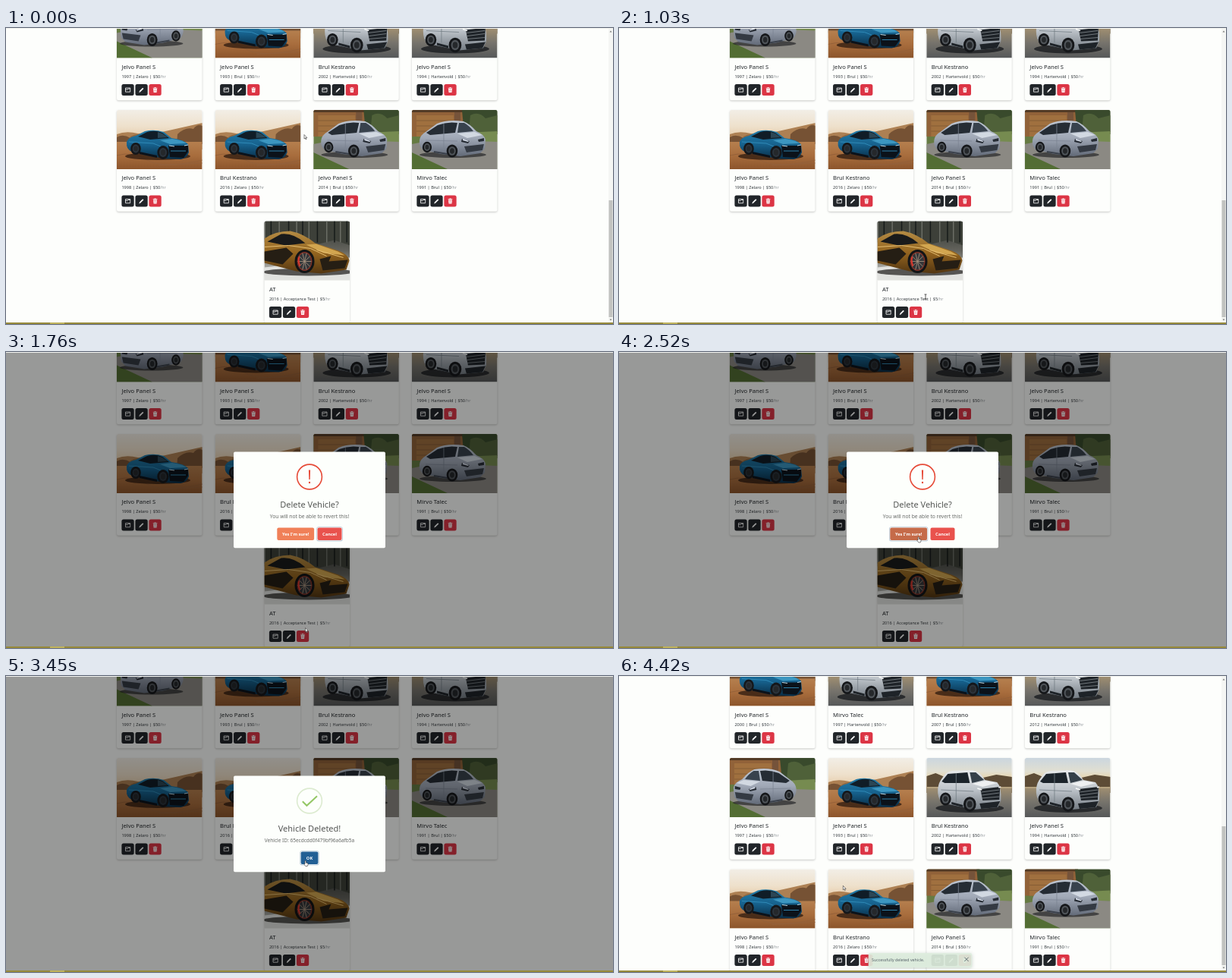
Animation, 800 px wide and 390 px high, one loop 4.45 s. Source, as an HTML page with a canvas:

```html
<!DOCTYPE html>
<html lang="en">
<head>
<meta charset="utf-8">
<title>Delete vehicle</title>
<style>
html, body { margin: 0; width: 100%; height: 100%; overflow: hidden; background: #fdfefc; }
canvas { display: block; width: 800px; height: 390px; }
</style>
</head>
<body>
<canvas id="stage" width="800" height="390"></canvas>
<script>
const g = document.getElementById('stage').getContext('2d');
const LOOP = 4450;
const FONT = '"Noto Sans", "Open Sans", sans-serif';
const ROW = 146.5, COL = 129.65, CARD_W = 112.5, PHOTO_H = 78;

const OPEN = 1330, CONFIRM = 2560, SUCCESS = 2650, DISMISS = 3520, REFRESH = 3560;

const clamp = v => Math.max(0, Math.min(1, v));
const smooth = v => v * v * (3 - 2 * v);

// Interpolates [time, ...values] keys.
function keyed(keys, t, ease = v => v) {
  let i = 0;
  while (i < keys.length - 2 && t >= keys[i + 1][0]) i++;
  const [a, b] = [keys[i], keys[i + 1]];
  const k = ease(clamp((t - a[0]) / (b[0] - a[0])));
  return a.slice(1).map((v, n) => v + (b[n + 1] - v) * k);
}

function rect(x, y, w, h, color) {
  g.fillStyle = color;
  g.fillRect(x, y, w, h);
}

function rounded(x, y, w, h, r, color) {
  g.beginPath();
  g.roundRect(x, y, w, h, r);
  g.fillStyle = color;
  g.fill();
}

function ellipse(x, y, rx, ry, color) {
  g.beginPath();
  g.ellipse(x, y, rx, ry, 0, 0, Math.PI * 2);
  g.fillStyle = color;
  g.fill();
}

const paths = new Map();
function path(d) {
  if (!paths.has(d)) paths.set(d, new Path2D(d));
  return paths.get(d);
}
function shape(color, d) {
  g.fillStyle = color;
  g.fill(path(d));
}
function line(color, width, d) {
  g.strokeStyle = color;
  g.lineWidth = width;
  g.stroke(path(d));
}

function text(str, x, y, size, weight, color, align = 'left') {
  g.font = `${weight} ${size}px ${FONT}`;
  g.textAlign = align;
  g.fillStyle = color;
  g.fillText(str, x, y);
  return g.measureText(str).width;
}

function gradient(y0, y1, ...colors) {
  const fill = g.createLinearGradient(0, y0, 0, y1);
  colors.forEach((c, i) => fill.addColorStop(i / (colors.length - 1), c));
  return fill;
}

function wheel(x, y, r, rim = '#50555a') {
  ellipse(x, y, r * .85, r, '#15171a');
  ellipse(x, y, r * .55, r * .68, rim);
  ellipse(x, y, r * .34, r * .44, '#25282b');
}

function hatchback() {
  ellipse(54, 59, 44, 4, 'rgba(30,30,33,.65)');
  shape(gradient(13, 60, '#bfc7d3', '#a1a9b7', '#656d7b'), 'M10 40Q11 33 18 29L33 18Q47 12 68 15Q76 18 85 28Q95 32 97 39L96 51L90 57L64 61L38 58L14 52Q9 47 10 40Z');
  shape('#252c34', 'M19 30L34 20Q47 15 60 17L57 30L24 33Z');
  shape('#38424d', 'M62 17L69 17Q76 21 81 28L60 30Z');
  shape('#d2d9e2', 'M60 31L83 29L93 33L73 37Z');
  shape('#262c34', 'M66 38L76 41L74 44L65 42ZM87 39L95 37L95 41L88 42Z');
  shape('#d9e0ed', 'M67 38L75 41L74 42L67 40Z');
  shape('#343a43', 'M69 48L95 45L93 53L72 56Z');
  shape('#3a404a', 'M29 54L47 57L47 59L29 56Z');
  line('#7d8593', .8, 'M18 40L60 41M42 18L42 53');
  wheel(20, 49, 7.2);
  wheel(53, 54, 8.6);
}

function driveway() {
  rect(0, 0, 112.5, 78, '#667b43');
  rect(0, 0, 70, 35, '#916239');
  rect(6, 7, 49, 28, '#a0703f');
  rect(0, 0, 70, 3, '#533b26');
  rect(56, 3, 8, 32, '#75533a');
  line('#7a5332', .7, 'M6 14H55M6 21H55M6 28H55');
  shape('#394a2c', 'M66 0H113V32H69Z');
  shape('#4f6139', 'M77 7Q88 1 97 11L113 7V29H75Z');
  shape('#768b50', 'M68 30L113 28V42H68Z');
  shape('#8b8983', 'M0 45L30 39L113 42V78H45L0 57Z');
  shape('#536d34', 'M0 56L47 78H0Z');
}

const photos = {
  coupe() {
    rect(0, 0, 112.5, 78, gradient(0, 44, '#f2eee6', '#eee0cb', '#e3c299'));
    shape('#ad8053', 'M0 32Q12 27 28 31L55 30Q82 24 113 17V52H0Z');
    shape('#765234', 'M80 32Q90 22 101 25Q106 18 113 21V45H79ZM0 36Q8 31 18 37V45H0Z');
    shape('#926840', 'M18 35Q28 29 38 35L32 42H16Z');
    rect(0, 42, 112.5, 36, gradient(42, 78, '#b57f4e', '#a86d3d', '#8c552c'));
    line('#946039', 1, 'M0 60Q20 54 40 66T113 66M55 73L113 70');
    ellipse(54, 61, 43, 5, 'rgba(43,24,14,.75)');
    shape(gradient(26, 64, '#237ca8', '#17638f', '#092f49'), 'M13 42Q15 36 25 34L37 28Q49 25 62 29L72 37Q88 39 94 45L95 56Q92 64 84 65L62 64L20 55Q12 52 13 42Z');
    shape('#101d27', 'M28 35L40 29Q51 26 60 30L69 37L44 39Z');
    shape('#2b4655', 'M54 29L60 31L67 36L54 37Z');
    shape('#3c96c0', 'M57 40L73 38Q88 40 92 44L70 45Z');
    shape('#0b121a', 'M68 47L94 47V55L88 63L70 62ZM30 55L53 60L53 63L30 58Z');
    line('#338eba', .9, 'M16 42L48 44L58 48M71 54L91 54');
    line('#c1d8e2', 1, 'M69 47L76 48M89 47L94 46');
    wheel(25, 51, 8, '#2c343c');
    wheel(61, 56, 9, '#2c343c');
  },
  hatch() {
    driveway();
    hatchback();
  },
  hatchLeft() {
    driveway();
    g.translate(97, 0);
    g.scale(-.95, 1);
    hatchback();
  },
  suv() {
    rect(0, 0, 112.5, 46, gradient(0, 35, '#cbd6df', '#e1dfd1', '#edce91'));
    shape('#5d4c36', 'M0 24L12 20L24 25L44 23L70 27L92 22L113 25V46H0Z');
    rect(0, 38, 112.5, 40, gradient(38, 78, '#a29071', '#76736c', '#565859'));
    line('#c9b58d', 1, 'M0 39H113');
    ellipse(57, 66, 45, 6, 'rgba(20,23,27,.75)');
    shape(gradient(16, 68, '#e8eaec', '#bdc3c9', '#747c84'), 'M15 40Q16 32 21 26Q25 18 34 17L60 16Q70 17 77 29L93 32Q99 38 98 56L94 65L62 68L20 59Q14 52 15 40Z');
    shape('#1c242b', 'M20 31L28 21L54 19L57 33L24 33Z');
    shape('#354049', 'M57 19H65L76 29L60 33Z');
    shape('#eef0f1', 'M60 34L78 30L93 33L74 38Z');
    shape('#1e2328', 'M71 41L97 38L96 55L74 56ZM70 60L97 57L93 65L72 67ZM33 58L48 62L48 65L33 61Z');
    line('#949b9f', .7, 'M72 45L96 42M73 49L96 46M73 53L96 51');
    line('#f8fafa', 1.6, 'M67 40L73 42M95 39L98 38');
    line('#747e86', .8, 'M19 42L62 44M39 20V58');
    wheel(25, 54, 8.6);
    wheel(57, 61, 9.8);
  },
  sports() {
    rect(0, 0, 112.5, 78, gradient(0, 78, '#292d2b', '#64645d', '#dadbd7'));
    shape('#3d4039', 'M0 0H113V32L92 25L72 30L0 24Z');
    for (let i = 0; i < 12; i++) rect(i * 10 + 2 * Math.sin(i * 5), 0, 1.5, 28, i % 2 ? '#171b1a' : '#6b6d65');
    shape('#e1e2df', 'M0 61L113 48V78H0Z');
    ellipse(58, 67, 60, 5, 'rgba(27,25,23,.7)');
    shape(gradient(14, 70, '#b38a43', '#93641f', '#503411'), 'M0 23Q14 13 34 13Q51 16 67 29L98 39Q111 44 112 52L108 64L75 69L42 66L0 55Z');
    shape('#191a1b', 'M4 27L22 17Q38 15 54 29L28 32Z');
    shape('#d2a650', 'M55 31L68 30L97 40L106 45L78 42Z');
    shape('#251e14', 'M0 40L29 35L38 43L24 57L0 52ZM73 50L88 46L85 53L110 51L106 62L77 65Z');
    line('#e4bd70', 1, 'M0 34L32 32L61 36L82 46M69 38L104 48');
    ellipse(53, 53, 13, 15.5, '#121416');
    ellipse(53, 53, 10, 12.5, '#813127');
    ellipse(53, 53, 8.6, 11, '#34373a');
    for (let i = 0; i < 10; i++) {
      const a = i * Math.PI / 5;
      g.beginPath();
      g.moveTo(53, 53);
      g.lineTo(53 + 9 * Math.cos(a), 53 + 11.5 * Math.sin(a));
      g.strokeStyle = '#a18d7a';
      g.lineWidth = .9;
      g.stroke();
    }
    line('#d8382e', 2, 'M46 47Q44 53 47 59');
  }
};

const SEDAN = 'Jelvo Panel S', PONY = 'Brul Kestrano', CITY = 'Mirvo Talec';
const Z = 'Zelaro', B = 'Brul', H = 'Hartenvold';
const rows = [
  [['coupe', SEDAN, 2000, B], ['suv', CITY, 1997, H], ['coupe', PONY, 2007, B], ['suv', PONY, 2012, H]],
  [['hatchLeft', SEDAN, 1997, Z], ['coupe', SEDAN, 1993, B], ['suv', PONY, 2002, H], ['suv', SEDAN, 1994, H]],
  [['coupe', SEDAN, 1998, Z], ['coupe', PONY, 2016, Z], ['hatch', SEDAN, 2014, B], ['hatch', CITY, 1991, B]]
];
const lastCar = ['sports', 'AT', 2016, 'Acceptance Test', 5];

function cardButtons(hover) {
  ['#212529', '#212529', hover ? '#bb2d3b' : '#dc3545'].forEach((c, i) => rounded(6.4 + i * 18, 112.5, 16.3, 15, 2.5, c));
  line('#fff', .8, 'M11.5 117.5H17.7V122.7H11.5ZM11.5 119.5H14.5L15.2 118.5H17.7');
  line('#fff', 1.7, 'M30.4 122.2L34.8 117.8');
  shape('#fff', 'M29.2 123.5L30 121.4L31.3 122.7Z');
  shape('#fff', 'M48.1 118.5H53L52.5 123.4H48.6ZM47.7 117.2H53.4V118.1H47.7ZM49.6 116.5H51.5V117.2H49.6Z');
  line('#dc3545', .4, 'M49.8 119.3V122.6M51.3 119.3V122.6');
}

function card(x, y, [photo, title, year, maker, price = 50], hover) {
  g.save();
  g.translate(x, y);
  g.save();
  g.shadowColor = 'rgba(0,0,0,.22)';
  g.shadowBlur = 2.5;
  g.shadowOffsetY = 1;
  rounded(0, 0, CARD_W, 133.7, 2.5, '#fdfefc');
  g.restore();
  g.save();
  g.beginPath();
  g.roundRect(0, 0, CARD_W, PHOTO_H, [2.5, 2.5, 0, 0]);
  g.clip();
  photos[photo]();
  g.restore();
  text(title, 6.4, 92.2, 7.6, 500, '#212529');
  const w = text(`${year} | ${maker} | $${price}`, 6.4, 104.2, 5.6, 400, '#343a3f');
  text('/hr', 6.4 + w, 104.2, 5.2, 400, '#90969a');
  cardButtons(hover);
  g.restore();
}

function page(t) {
  const refreshed = t >= REFRESH;
  rows.forEach((cars, r) => {
    const y = -38.5 + ROW * (refreshed ? r : r - 1);
    if (y > -140) cars.forEach((car, c) => card(146 + c * COL, y, car));
  });
  if (!refreshed) card(340.5, 254.5, lastCar, t > 1150 && t < 1650);
}

function scrollbar(t) {
  if (t >= OPEN && t < DISMISS) return;
  const top = t < REFRESH ? 227 : 198;
  rect(794, 1, 6, 387, '#f5f6f4');
  rect(794.5, top, 5, 381 - top, '#c1c2c0');
  shape('#777', 'M795.5 5.5L797 3.5L798.5 5.5ZM795.5 383.5L797 385.5L798.5 383.5Z');
}

function modalButton(x, w, label, color, focused) {
  if (focused) {
    rounded(x - 1.3, 230.2, w + 2.6, 19.2, 3, '#b9cbd8');
    rounded(x - .5, 231, w + 1, 17.6, 2.4, '#fff');
  }
  rounded(x, 231.5, w, 16.6, 2, color);
  text(label, x + w / 2, 242, 5.7, 600, '#fff', 'center');
}

function ring(color) {
  g.beginPath();
  g.arc(400, 164.5, 16.4, 0, Math.PI * 2);
  g.strokeStyle = color;
  g.lineWidth = 1.6;
  g.stroke();
}

function confirmBox(t) {
  const hover = t >= 2150;
  ring('#e64b38');
  shape('#e64b38', 'M398.9 155.5H401.1L400.7 168H399.3Z');
  ellipse(400, 172, 1.2, 1.2, '#e64b38');
  text('Delete Vehicle?', 400, 205.2, 11, 500, '#555755', 'center');
  text('You will not be able to revert this!', 400, 219.4, 6.7, 400, '#666866', 'center');
  modalButton(357.3, 48.8, "Yes I'm sure!", hover ? '#c56b49' : '#f08058', t >= 2400);
  modalButton(410.5, 32, 'Cancel', '#e9524d', t < 2400);
}

function successBox(t) {
  ring('#dcebd0');
  const p = clamp((t - SUCCESS - 200) / 450);
  g.save();
  g.setLineDash([27 * smooth(p), 40]);
  if (p > 0) line('#94c766', 2, 'M390.8 165.2L396.4 170.8L410 158.3');
  g.restore();
  text('Vehicle Deleted!', 400, 205.2, 11, 500, '#555755', 'center');
  text('Vehicle ID: 65ecdcdd0f479bf96a6afb5a', 400, 219.4, 6.5, 400, '#666866', 'center');
  modalButton(388.6, 22.8, 'OK', '#215f94', true);
}

function modal(t) {
  const [alpha] = keyed([[OPEN, 0], [1630, 1], [CONFIRM, 1], [SUCCESS, .55], [2740, 1], [DISMISS, 1], [3790, 0]], t, smooth);
  if (alpha <= 0) return;
  g.save();
  g.globalAlpha = alpha;
  rect(0, 1, 800, 387, 'rgba(0,0,0,.4)');
  const done = t >= SUCCESS;
  const start = done ? SUCCESS : OPEN;
  const [scale] = keyed([[0, .5], [135, 1.05], [240, .95], [300, 1]], t - start, smooth);
  g.translate(400, 195);
  g.scale(scale, scale);
  g.translate(-400, -195);
  rounded(300, 131.5, 200, 126.7, 2, '#fdfffc');
  (done ? successBox : confirmBox)(t);
  g.restore();
}

function toast(t) {
  const p = smooth(clamp((t - 3690) / 160));
  if (p <= 0) return;
  g.save();
  g.globalAlpha = p;
  g.translate(0, 14 * (1 - p));
  g.save();
  g.shadowColor = 'rgba(60,90,70,.3)';
  g.shadowBlur = 5;
  g.shadowOffsetY = 1;
  rounded(328.7, 365, 136.3, 19, 2, 'rgba(222,238,222,.91)');
  g.restore();
  const ink = t < 4180 ? '#5c6f9b' : '#566269';
  text('Successfully deleted vehicle.', 333, 375.6, 5.25, 400, ink);
  line(ink, .9, 'M455.3 370.6L460.7 376M460.7 370.6L455.3 376');
  g.restore();
}

const route = [
  [0, 393, 140.5], [120, 393, 140.5], [1030, 404, 354], [1190, 392, 372], [1640, 392, 372],
  [1760, 394.5, 363.5], [2160, 394, 244], [3960, 394, 243.5], [4420, 295.3, 276.3]
];

function cursor(t) {
  const [x, y] = keyed(route, t, smooth);
  const overText = t > 990 && t < 1080;
  const overButton = (t > 1140 && t < OPEN + 60) || (t > 2120 && t < DISMISS + 60);
  g.save();
  g.translate(x, y);
  if (overText) {
    line('#333', .8, 'M-1.5 -3H1.5M0 -3V3M-1.5 3H1.5');
  } else {
    const outline = overButton
      ? 'M0 0Q1 -1 1.5 .4V2.5L4 3.2V5L3.2 7H.8L-1.2 4.4L-.6 3.7L0 4.2Z'
      : 'M0 0V5.6L1.3 4.4L2.2 6.4L3 6L2.1 4.1H3.9Z';
    shape('#fff', outline);
    line('#333', .6, outline);
  }
  g.restore();
}

function frame() {
  const t = performance.now() % LOOP;
  rect(0, 0, 800, 390, '#fdfefc');
  page(t);
  scrollbar(t);
  modal(t);
  toast(t);
  rect(0, 0, 800, 1, '#f0f1ee');
  rect(0, 388, 800, 2, '#96893a');
  rect(58, 388, 19, 2, '#bfb25b');
  cursor(t);
  requestAnimationFrame(frame);
}
frame();
</script>
</body>
</html>
```
